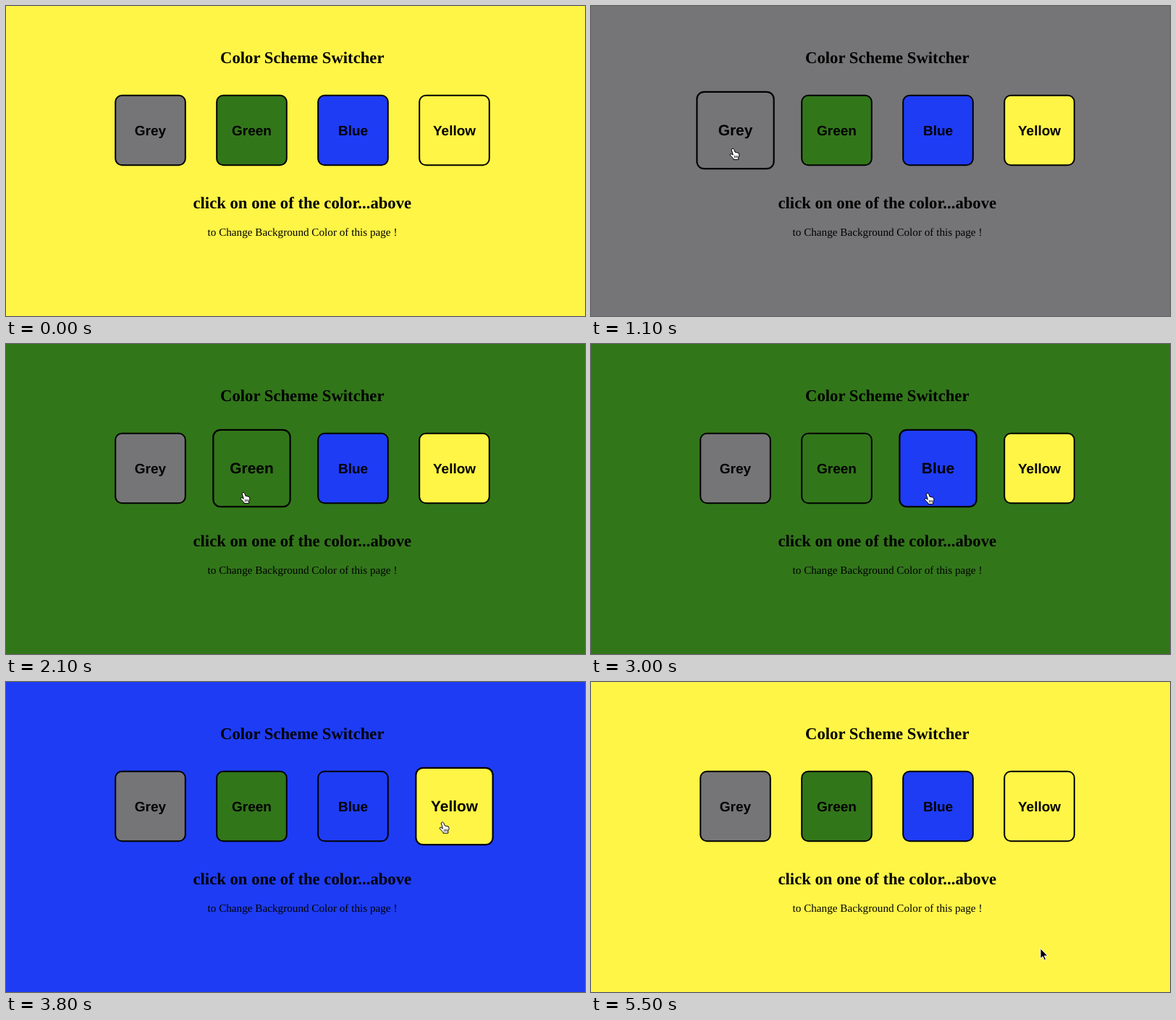
These frames come from a looping animation (800x429 px, 5.6 s). An HTML page:

```html
<!DOCTYPE html>
<html lang="en">
<head>
<meta charset="utf-8">
<title>Color Scheme Switcher</title>
<style>
  html, body { margin: 0; width: 100%; height: 100%; overflow: hidden; }
  svg { display: block; width: 100%; height: 100%; }
  text { text-anchor: middle; text-rendering: geometricPrecision; }
  .serif { font-family: "Liberation Serif", Times, serif; }
  .head { font-size: 22.7px; font-weight: bold; }
  .note { font-size: 15.2px; }
  .label { font: bold 19px "Liberation Sans", Arial, sans-serif; }
</style>
</head>
<body>
<svg viewBox="0 0 800 429" preserveAspectRatio="none">
  <rect id="page" width="800" height="429"/>
  <text class="serif head" x="409.3" y="79.4">Color Scheme Switcher</text>
  <g id="buttons"></g>
  <text class="serif head" x="409.3" y="279.5">click on one of the color...above</text>
  <text class="serif note" x="409.5" y="317.8">to Change Background Color of this page !</text>
  <g id="cursor" stroke-linejoin="round" stroke-linecap="round">
    <path id="arrow" stroke="#fff" d="M0 0V13.6L3.2 10.8L5.4 16L7.6 15L5.4 10H9.8Z"/>
    <g id="hand" fill="#fff" stroke="#000">
      <path d="M-1.7 1.4L0 0L1.7 1.6L3 5.2L8 6.4L9 9L7.7 13V15.6H.8V14.2L-4 9.2L-3 7.4L0 9Z"/>
      <path stroke-width=".8" d="M2.5 10.4V13M4.4 10.4V13M6.3 10.4V13"/>
    </g>
  </g>
</svg>
<script>
const LOOP = 5600, STEP = 100;
const FIRST_CLICK = 820, CLICK_GAP = 1180;
const GLIDE = 290, ARRIVE_AFTER = 670;
const HALF = 49.3, FIRST_X = 199.5, PITCH = 140, ROW_Y = 172;

// dx, dy: where the pointer rests inside each button
const schemes = [
  { name: "Grey", color: "#757577", dx: -3.5, dy: 25 },
  { name: "Green", color: "#32761a", dx: -11.5, dy: 33 },
  { name: "Blue", color: "#1e3cf4", dx: -14.5, dy: 34 },
  { name: "Yellow", color: "#fff546", dx: -4.5, dy: 20.5 }
];

const $ = id => document.getElementById(id);

function make(tag, attrs, parent) {
  const el = document.createElementNS("http://www.w3.org/2000/svg", tag);
  for (const key in attrs) el.setAttribute(key, attrs[key]);
  return parent.appendChild(el);
}

schemes.forEach((s, i) => {
  s.x = FIRST_X + i * PITCH;
  s.click = FIRST_CLICK + i * CLICK_GAP;
  s.el = make("g", {}, $("buttons"));
  make("rect", {
    x: 1 - HALF, y: 1 - HALF, width: 2 * HALF - 2, height: 2 * HALF - 2,
    rx: 9, fill: s.color, stroke: "#000", "stroke-width": 2
  }, s.el);
  make("text", { class: "label", y: 6.6 }, s.el).textContent = s.name;
});

// The pointer glides in from below, visits each button and leaves.
const entry = { x: 222, y: 440 };
const visits = schemes.map((s, i) => ({
  x: s.x + s.dx,
  y: ROW_Y + s.dy,
  at: i ? schemes[i - 1].click + ARRIVE_AFTER : FIRST_CLICK - STEP
}));
const stops = [...visits, { x: 621, y: 369, at: 5200 }];

function pointerAt(t) {
  let { x, y } = entry;
  for (const stop of stops) {
    const k = Math.min(1, Math.max(0, 1 - (stop.at - t) / GLIDE));
    const ease = k * k * (3 - 2 * k);
    x += (stop.x - x) * ease;
    y += (stop.y - y) * ease;
  }
  return { x, y };
}

function draw(t) {
  const p = pointerAt(t);
  const active = schemes.filter(s => s.click <= t).pop() || schemes[3];
  const hovered = schemes.find(s =>
    Math.abs(p.x - s.x) < HALF && Math.abs(p.y - ROW_Y) < HALF);

  $("page").setAttribute("fill", active.color);
  for (const s of schemes) {
    const scale = s === hovered ? 1.1 : 1;
    s.el.setAttribute("transform", `translate(${s.x} ${ROW_Y}) scale(${scale})`);
  }
  $("cursor").setAttribute("transform", `translate(${p.x} ${p.y})`);
  $("hand").style.display = hovered ? "" : "none";
  $("arrow").style.display = hovered ? "none" : "";
}

function tick() {
  const t = performance.now() % LOOP;
  draw(Math.floor(t / STEP) * STEP);
  requestAnimationFrame(tick);
}
tick();
</script>
</body>
</html>
```
